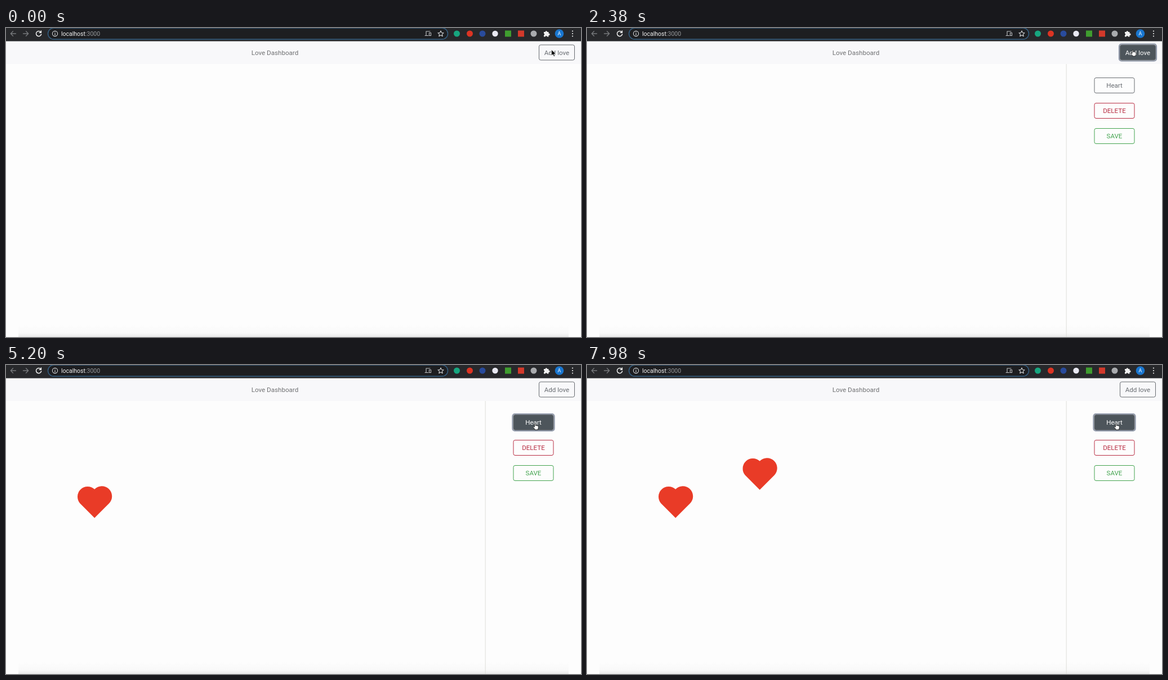
An HTML page that plays this animation: 1021 by 549 pixels, repeating every 8 s.

```html
<!DOCTYPE html>
<html lang="en">
<head>
<meta charset="utf-8">
<title>Love Dashboard</title>
<style>
  html, body { margin: 0; width: 100%; height: 100%; overflow: hidden; background: #fdfdfd; }
  svg { display: block; font: 11.6px Roboto, "Open Sans", sans-serif; }
  .line { fill: none; stroke-linecap: round; stroke-linejoin: round; }
</style>
</head>
<body>
<svg id="stage" width="1021" height="549" viewBox="0 0 1021 549">
  <defs>
    <linearGradient id="shade" x2="0" y2="1">
      <stop offset="0" stop-color="#fdfdfd"/>
      <stop offset=".65" stop-color="#f9f9f9"/>
      <stop offset="1" stop-color="#e9e9e9"/>
    </linearGradient>
    <path id="heart" fill="#e93b27" d="M157.2 271.7 131.3 245.7A18 18 0 0 1 157.2 220.8 18 18 0 0 1 183.2 245.7Z"/>
  </defs>

  <rect width="1021" height="549" fill="#fdfdfd"/>
  <rect x="22" y="528" width="977" height="21" fill="url(#shade)"/>
  <rect y="23" width="1021" height="41" fill="#f8f8fa"/>
  <text x="477.5" y="48" text-anchor="middle" fill="#707173">Love Dashboard</text>

  <!-- browser toolbar -->
  <rect width="1021" height="23.5" fill="#27282b"/>
  <rect x="74.5" y="0" width="710" height="20" rx="10" fill="#1d1e21" stroke="#355f82" stroke-width="1.5"/>
  <g class="line" stroke="#77797c" stroke-width="1.3">
    <path d="M17.5 10H8.5M12.5 5.8 8.3 10l4.2 4.2M30.5 10h9M35.5 5.8 39.7 10l-4.2 4.2"/>
    <path stroke="#f1f1f1" stroke-width="1.5" d="M61.5 7A4.6 4.6 0 1 0 62.6 11M62.4 5v3.2h-3.2"/>
    <circle cx="87" cy="10" r="4.6" stroke="#d5d6d8" stroke-width="1.1"/>
    <path stroke="#d5d6d8" d="M87 9.8v2.4M87 7.6v.1"/>
    <path stroke="#bfc1c4" stroke-width="1.1" d="M753 6h-7v6.5M744 13.5h6M751.5 8.5h3v5h-3z"/>
    <path stroke="#cfd0d2" stroke-width="1.1" d="M772 5l1.5 3.3 3.6.4-2.7 2.4.8 3.6-3.2-1.9-3.2 1.9.8-3.6-2.7-2.4 3.6-.4z"/>
  </g>
  <text x="98" y="13.8" font-size="10.5" fill="#f4f4f4">localhost<tspan fill="#97999c">:3000</tspan></text>
  <circle cx="800.5" cy="10" r="5.5" fill="#17a67f"/>
  <circle cx="823.5" cy="10" r="5.5" fill="#dc3423"/>
  <circle cx="846" cy="10" r="5.5" fill="#294b9c"/>
  <circle cx="868.5" cy="10" r="5.2" fill="#e9e9f3"/>
  <rect x="886" y="4.5" width="11" height="11" fill="#3f9d2f"/>
  <rect x="909" y="4.5" width="11" height="11" fill="#d3392b"/>
  <circle cx="937" cy="10" r="5.5" fill="#a9abae"/>
  <path fill="#f0f0f0" d="M955 7h2.6a1.7 1.7 0 1 1 3.4 0h2.5v2.7a1.7 1.7 0 1 1 0 3.3v2.5h-2.7a1.6 1.6 0 0 0-3.2 0H955v-2.7a1.6 1.6 0 0 0 0-3.1z"/>
  <circle cx="982.5" cy="10" r="7.8" fill="#1976cf"/>
  <text x="982.5" y="13.3" text-anchor="middle" font-size="9" fill="#fff">A</text>
  <path class="line" stroke="#f0f0f0" stroke-width="2.2" d="M1006 5.5v0M1006 10v0M1006 14.5v0"/>

  <g id="panel">
    <path d="M851.2 64V549" stroke="#deded9"/>
  </g>
  <use id="first" href="#heart"/>
  <use id="second" href="#heart" x="149.5" y="-50"/>
  <g id="buttons"></g>
  <g id="cursor">
    <path id="arrow" fill="#050505" stroke="#fff" stroke-width=".8" d="M0 0v10.5l2.4-2.2 1.7 3.9 1.8-.8-1.7-3.7h3.4z"/>
    <path id="hand" fill="#fff" stroke="#111" stroke-width=".8" stroke-linejoin="round" d="M-.7 1q.9-1.4 1.8 0v3.1q1-.7 1.7.1 1-.5 1.7.3 1.4-.4 1.6 1v2.6q0 1.2-1 2.3v1H-.3v-1.1L-3 6.8q-.3-1.4 1-1.2l1.3 1.1z"/>
  </g>
</svg>

<script>
const LOOP = 8000;
const $ = id => document.getElementById(id);

// Linear interpolation through [time, value] points, clamped at both ends.
function track(time, points) {
  let [t0, v0] = points[0];
  for (const [t1, v1] of points) {
    if (time < t1) return time <= t0 ? v0 : v0 + (v1 - v0) * (time - t0) / (t1 - t0);
    [t0, v0] = [t1, v1];
  }
  return v0;
}

const smooth = p => p * p * (3 - 2 * p);

function mix(from, to, amount) {
  return `rgb(${from.map((c, i) => Math.round(c + (to[i] - c) * amount))})`;
}

function add(parent, tag, attrs) {
  const node = document.createElementNS("http://www.w3.org/2000/svg", tag);
  for (const key in attrs) node.setAttribute(key, attrs[key]);
  return parent.appendChild(node);
}

function button(parent, label, x, y, width, color) {
  const ring = add(parent, "rect", { x: x - 1.5, y: y - 1.5, width: width + 3, height: 30, rx: 4,
    fill: "none", stroke: "#8e97a8", "stroke-width": 2.2, opacity: 0 });
  const box = add(parent, "rect", { x, y, width, height: 27, rx: 3, fill: "transparent", stroke: `rgb(${color})` });
  const text = add(parent, "text", { x: x + width / 2, y: y + 17.6, "text-anchor": "middle", fill: `rgb(${color})` });
  text.textContent = label;
  return (hover, focus) => {
    box.setAttribute("fill", `rgb(77 85 91 / ${hover})`);
    text.setAttribute("fill", mix(color, [255, 255, 255], hover));
    ring.setAttribute("opacity", focus);
  };
}

const gray = [104, 108, 113];
const paintAdd = button($("buttons"), "Add love", 946.5, 30, 63, gray);
const paintHeart = button($("panel"), "Heart", 901, 88.5, 71, gray);
button($("panel"), "DELETE", 901, 133.5, 71, [184, 44, 66]);
button($("panel"), "SAVE", 901, 178.5, 71, [66, 163, 78]);

const show = (id, visible) => $(id).setAttribute("visibility", visible ? "visible" : "hidden");

function draw(time) {
  paintAdd(
    track(time, [[1390, 0], [1420, .46], [1520, .46], [1560, 1], [2620, 1], [2740, 0]]),
    track(time, [[1760, 0], [1860, 1], [3820, 1], [3890, 0]]));
  paintHeart(
    track(time, [[2800, 0], [2940, 1]]),
    track(time, [[3860, 0], [3900, .45], [3920, .45], [3980, 1]]));

  show("panel", time >= 1800);
  show("first", time >= 3880);
  show("second", time >= 7430);

  const travel = smooth(track(time, [[2480, 0], [3040, 1]]));
  const settle = smooth(track(time, [[3200, 0], [3560, 1]]));
  const x = 968.8 - 27 * travel - 2.6 * settle;
  const y = 38.6 + 60.4 * travel + 4.6 * settle;
  const pointing = time >= 1390 && !(time > 2640 && time < 2800);
  $("cursor").setAttribute("transform", `translate(${x} ${y})`);
  show("arrow", !pointing);
  show("hand", pointing);
}

function tick() {
  draw(performance.now() % LOOP);
  requestAnimationFrame(tick);
}
tick();
</script>
</body>
</html>
```
